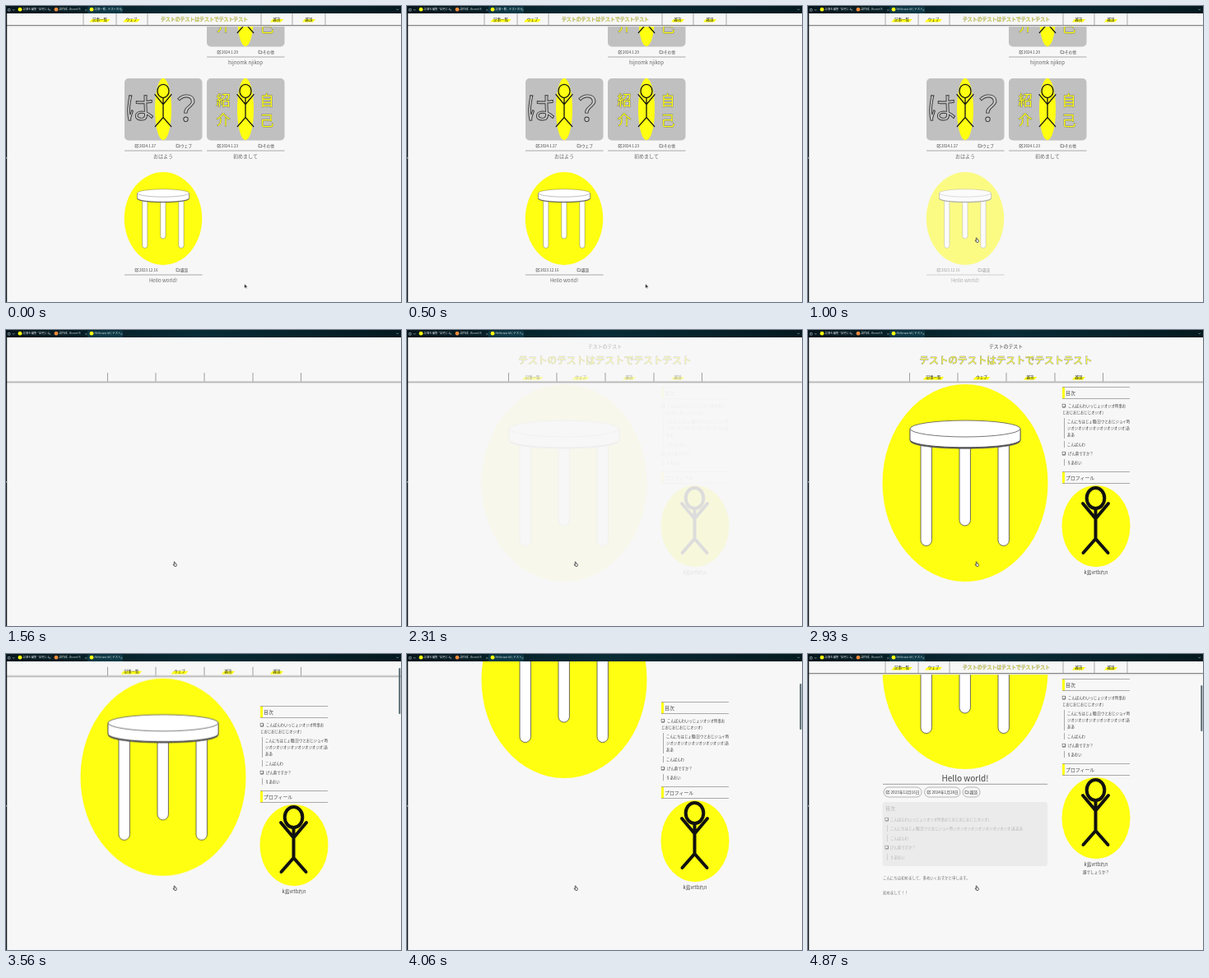
An HTML page that plays this animation: 480 px wide and 360 px high, repeating every 5000 ms.

```html
<!DOCTYPE html>
<html lang="ja">
<head>
<meta charset="utf-8">
<title>テストのテスト</title>
<style>
  html, body { margin: 0; width: 100%; height: 100%; overflow: hidden; background: #f7f7f7; }
  svg { display: block; width: 480px; height: 360px; }
  text { font-family: "Noto Sans CJK JP", "Noto Sans CJK", "Noto Sans", sans-serif; fill: #444; white-space: pre; }
  .title { fill: #ffff38; stroke: #8a8a8a; paint-order: stroke; }
</style>
</head>
<body>
<svg id="stage" viewBox="0 0 480 360"></svg>
<script>
const LOOP = 5000;
const YELLOW = '#ffff11';
const PAPER = '#f7f7f7';
const SITE = 'テストのテストはテストでテストテスト';
const NAV = ['記事一覧', 'ウェブ', '雑貨', '雑談'];
const AUTHOR = 'k島vrtbれn';

// Drawing helpers; text is placed by its vertical centre.
const text = (x, y, size, str, attrs = '') =>
  `<text x="${x}" y="${y + size * 0.37}" font-size="${size}" ${attrs}>${str}</text>`;
const mid = (x, y, size, str, attrs = '') => text(x, y, size, str, `text-anchor="middle" ${attrs}`);
const rect = (x, y, w, h, attrs = '') => `<rect x="${x}" y="${y}" width="${w}" height="${h}" ${attrs}/>`;
const oval = (cx, cy, rx, ry, attrs = `fill="${YELLOW}"`) =>
  `<ellipse cx="${cx}" cy="${cy}" rx="${rx}" ry="${ry}" ${attrs}/>`;
const path = (d, stroke = '#777', width = 0.7, attrs = 'fill="none"') =>
  `<path d="${d}" stroke="${stroke}" stroke-width="${width}" ${attrs}/>`;
const group = (id, body, attrs = '') => `<g id="${id}" ${attrs}>${body}</g>`;
const shift = (x, y, body) => `<g transform="translate(${x} ${y})">${body}</g>`;

const editIcon = (x, y) =>
  path(`M${x + 0.4} ${y - 1.6}H${x - 1.9}V${y + 1.9}H${x + 1.6}V${y + 0.4}`, '#444', 0.6) +
  path(`M${x - 0.4} ${y + 0.5}L${x + 2} ${y - 1.9}`, '#444', 0.9);
const folderIcon = (x, y) =>
  path(`M${x - 2} ${y + 1.7}V${y - 1.7}H${x - 0.3}L${x + 0.3} ${y - 1}H${x + 2}V${y + 1.7}Z`, '#444', 0.6);
const checkIcon = (x, y) =>
  path(`M${x - 1.6} ${y + 2}H${x + 2}V${y - 1.6}`, '#555', 0.9) +
  rect(x - 1.6, y - 1.8, 3.2, 3.4, 'fill="#fff" stroke="#555" stroke-width=".6"');

const stick = (x, y, scale, width) => `<g transform="translate(${x} ${y}) scale(${scale})">` +
  oval(0, -34, 10.8, 12.5, `fill="none" stroke="#111" stroke-width="${width}"`) +
  path('M0 -21.5V15.5M-15.5 -27.5L0 -9L15.5 -27.5M-15 32.5L0 15.5L15 32.5', '#111', width,
    'fill="none" stroke-linecap="round"') + '</g>';

function stool(x, y, scale) {
  const leg = (lx, bottom) =>
    rect(lx, -60, 13.4, bottom + 60, 'rx="6.7" fill="#fff" stroke="#444" stroke-width=".8"');
  const seat = 'M-67 -66V-53C-67 -40 67 -40 67 -53V-66';
  return `<g transform="translate(${x} ${y}) scale(${scale})">` +
    oval(0, 0, 100.5, 120) + leg(-54, 76.5) + leg(-7, 52) + leg(40, 76.5) +
    shift(0, 1.5, path(seat, '#555', 0.6, 'fill="#555"')) +
    path(seat, '#444', 0.8, 'fill="#fff"') +
    oval(0, -66, 67, 10, 'fill="#fff" stroke="#555" stroke-width=".8"') + '</g>';
}

const navItem = (x, y, label) => {
  const half = label.length * 2.3 + 2.5;
  return `<path d="M${x - half - 1} ${y + 3.4}L${x - half + 2} ${y}H${x + half + 1}L${x + half - 2} ${y + 3.4}Z" fill="${YELLOW}"/>` +
    mid(x, y, 4.5, label, 'style="fill:#222"');
};

const border = y => rect(0, y - 0.5, 480, 1, 'fill="#858585"') + rect(0, y + 0.5, 480, 1.2, 'fill="#ddd"');

function stickyBar() {
  const xs = [114, 152.5, 329, 368];
  return rect(0, 8, 480, 15, `fill="${PAPER}"`) + border(23.5) +
    path([94, 134, 172, 310, 348, 388].map(x => `M${x} 9V23`).join(''), '#888', 0.7) +
    NAV.map((label, i) => navItem(xs[i], 16, label)).join('') +
    mid(241, 16, 5.9, SITE, 'class="title" stroke-width=".5"');
}

// List page
const cardFoot = (x, y, date, tag, title) =>
  editIcon(x + 15, y) + text(x + 18, y, 4.5, date) +
  folderIcon(x + 65, y) + text(x + 68, y, 4.6, tag) +
  path(`M${x} ${y + 6}h94.5`, '#888', 0.7) +
  mid(x + 47, y + 13, 6, title, 'style="fill:#666"');

const thumb = (x, y, letters) =>
  rect(x, y, 94.5, 75.5, 'rx="5" fill="#c0c0c0"') +
  oval(x + 47, y + 37.5, 10, 37.7) + letters + stick(x + 47, y + 37.5, 0.65, 2);

function introCard(x, y, date, title) {
  const style = `style="fill:${YELLOW};stroke:#777;stroke-width:.9;paint-order:stroke"`;
  const letter = (dx, dy, c) => mid(x + dx, y + dy, 17, c, style);
  return thumb(x, y, letter(20, 27, '紹') + letter(20, 51, '介') + letter(73, 27, '自') + letter(73, 52, '己')) +
    cardFoot(x, y + 82, date, 'その他', title);
}

function listPage() {
  const style = 'style="fill:#c6c6c6;stroke:#333;stroke-width:.9"';
  const hello = mid(162, 124, 37, 'は', style) + mid(219, 124, 42, '？', style);
  return introCard(244, -26, '2024.1.29', 'hijnomk njikop') +
    thumb(144, 88, hello) + cardFoot(144, 170, '2024.1.27', 'ウェブ', 'おはよう') +
    introCard(244, 88, '2024.1.23', '初めまして') +
    group('hoverCard', stool(191, 258.5, 0.47) + cardFoot(144, 321, '2023.12.16', '雑談', 'Hello world!')) +
    stickyBar();
}

// Post page
const TOC = ['こんばんわいっじょジオジオ時事お', 'じおじおじおじじオジオ]',
  'こんにちはじょ職[日ウとおじジョイ時', 'ジオジオジオジオジオジオジオジオ]あ', 'ああ',
  'こんばんわ', 'げん黄ですか？', '§あおい'];

const sideHead = (y, label) => rect(309, y, 3, 14, `fill="${YELLOW}"`) +
  path(`M309 ${y}h82M309 ${y + 14}h82`, '#888', 0.7) + text(313, y + 7.3, 5.9, label);

function sidebar() {
  const xs = [316, 309, 315, 315, 315, 315, 316, 315];
  const ys = [92, 100, 111, 119, 127, 139, 150, 161];
  return group('toc', sideHead(69.5, '目次') +
      TOC.map((line, i) => text(xs[i], ys[i], 4.4, line)).join('') +
      checkIcon(310.7, 92) + checkIcon(310.7, 150) +
      path('M311.5 107v25M311.5 135v8M311.5 157v8', '#888', 0.7) +
      sideHead(172.5, 'プロフィール')) +
    group('profile', oval(350, 238.5, 41.5, 49.5) + stick(349.5, 238.5, 1, 4) + mid(350, 295, 5.7, AUTHOR)) +
    group('bio', mid(350, 304, 4.6, '誰でしょうか？'));
}

function article() {
  const pill = (x, w) => rect(x, 162, w, 12, 'rx="6" fill="none" stroke="#999" stroke-width=".7"');
  const rows = [TOC[0] + TOC[1], TOC.slice(2, 5).join(''), ...TOC.slice(5)];
  const ys = [201, 212, 224, 235, 247];
  return group('heading', mid(191, 151, 10, 'Hello world!') + path('M91 158.3h200', '#888', 0.8) +
      pill(92, 46) + pill(141.5, 43.5) + pill(188, 21) +
      editIcon(97, 168) + text(100.5, 168, 4.7, '2023年12月16日') +
      editIcon(147, 168) + text(150.5, 168, 4.7, '2024年1月28日') +
      folderIcon(193, 168) + text(196.5, 168, 4.7, '雑談')) +
    group('contents', rect(90.5, 180, 200.5, 78, 'rx="4" fill="#ebebeb"') +
      `<g opacity=".32">${text(94, 188, 6, '目次')}` +
      rows.map((row, i) => text(100, ys[i], 4.4, row)).join('') +
      path('M96.5 208v8M96.5 220v8M96.5 243v8', '#777', 0.7) + '</g>' +
      `<g opacity=".7">${checkIcon(95.5, 201)}${checkIcon(95.5, 235)}</g>`) +
    group('body', text(91, 272, 4.45, 'こんにちは初めまして、多めいくおすかと申します。') +
      text(91, 290.5, 4.45, '初めまして！！'));
}

function postPage() {
  const xs = [152.5, 211, 270, 329];
  const head = path([123.5, 182, 241, 300, 358.5].map(x => `M${x} 52V62.5`).join(''), '#777', 0.7) + border(63.2) +
    group('head', mid(240.5, 20, 5.9, 'テストのテスト') +
      mid(240.5, 37, 11.7, SITE, 'class="title" stroke-width=".8"') +
      NAV.map((label, i) => navItem(xs[i], 57, label)).join(''));
  return group('scroller', head + group('hero', stool(191, 186, 1)) + shift(0, 166, article())) +
    group('side', sidebar()) + group('bar', stickyBar()) +
    group('thumbBar', rect(477.3, 11, 2, 56, 'rx="1" fill="#50666c"'));
}

// Browser chrome
function chrome() {
  const white = 'style="fill:#dfe7e9"';
  const tab = (x, color, label, id) => `<circle cx="${x}" cy="4.2" r="2.4" fill="${color}"/>` +
    (id ? '' : text(x + 3.5, 4.2, 3.4, label, white)) + text(x + 34.5, 4.2, 3.6, '×', white);
  return rect(0, 9, 1.2, 351, 'fill="#10181c"') + rect(0, 184, 1.2, 1.5, 'fill="#9ab"') +
    rect(0, 0, 480, 9, 'fill="url(#sky)"') +
    rect(99, 0.6, 43, 8.4, 'rx="1.5" fill="#0d3946"') +
    path('M2.5 6V3.5H5V6ZM8 4L9.3 5.3L10.6 4M474.5 3.7L475.7 5L477 3.7', '#b8c6ca', 0.6) +
    tab(17, YELLOW, '記事を編集 "自宅にえ') + tab(61, '#f08a3c', '設作成 - Borvel S') + tab(104, YELLOW, '', true) +
    group('tabList', text(107.5, 4.2, 3.4, '記事一覧 - テストのテ', white)) +
    group('tabPost', text(107.5, 4.2, 3.4, 'Hello world! | テスト', white));
}

const arrow = path('M0 0V5.2L1.3 4.1L2.1 5.8L2.9 5.4L2.1 3.8H3.7Z', '#fff', 0.4, 'fill="#111"');
const hand = path('M-.8 2.6V-1.8Q-.3 -2.6 .2 -1.8V0L2 .4Q2.6 .7 2.4 1.6L1.9 3.4H-.2L-1.7 1.4Q-1.6 .7 -.8 1.3',
  '#222', 0.7, 'fill="#fff"');

const stage = document.getElementById('stage');
stage.innerHTML =
  '<defs><linearGradient id="sky"><stop stop-color="#05161c"/><stop offset=".5" stop-color="#082c36"/>' +
  '<stop offset="1" stop-color="#04191f"/></linearGradient></defs>' +
  rect(0, 0, 480, 360, `fill="${PAPER}"`) +
  group('list', listPage()) + group('post', postPage()) + chrome() +
  group('pointer', group('arrow', arrow) + group('hand', hand));

// Each key is [ms, value, easing]; equal times make a hard change.
function play(id, prop, keys) {
  const all = [[0, keys[0][1]], ...keys, [LOOP, keys[keys.length - 1][1]]];
  document.getElementById(id).animate(
    all.map(([t, value, easing = 'linear']) => ({ offset: t / LOOP, [prop]: value, easing })),
    { duration: LOOP, iterations: Infinity });
}
const fade = (id, ...keys) => play(id, 'opacity', keys);
const slide = (id, ...keys) => play(id, 'transform', keys.map(([t, y, e]) => [t, `translate(0px, ${y}px)`, e]));
const cut = (id, t, from, to) => fade(id, [t, from], [t, to]);

play('pointer', 'transform', [
  [500, 'translate(289.7px, 338px)', 'ease-in-out'],
  [800, 'translate(205px, 284px)'],
]);
cut('arrow', 720, 1, 0);
cut('hand', 720, 0, 1);
fade('hoverCard', [740, 1], [960, 0.5]);
cut('tabList', 940, 1, 0);
cut('tabPost', 940, 0, 1);
cut('list', 1450, 1, 0);
cut('post', 1450, 0, 1);

fade('head', [2150, 0], [2310, 0.38], [2560, 1]);
fade('hero', [2290, 0], [2310, 0.045], [2600, 1]);
fade('toc', [2290, 0], [2310, 0.05], [2600, 1]);
fade('profile', [2270, 0], [2310, 0.11], [2600, 1]);

slide('scroller', [3360, 0, 'ease-in'], [3560, -36], [3810, -106], [4060, -155, 'ease-out'], [4400, -166]);
slide('thumbBar', [3360, 0, 'ease-in'], [3560, 6], [3810, 17], [4060, 25, 'ease-out'], [4400, 27]);
cut('thumbBar', 3360, 0, 1);
slide('side', [3360, 0], [3560, -6], [4060, -11], [4430, -14, 'ease-in-out'], [4800, -39]);
slide('bar', [4400, -17, 'ease-out'], [4700, 0]);
fade('heading', [4380, 0], [4740, 1]);
fade('contents', [4430, 0], [4850, 1]);
fade('body', [4500, 0], [4870, 0.75]);
fade('bio', [4380, 0], [4700, 1]);
</script>
</body>
</html>
```
